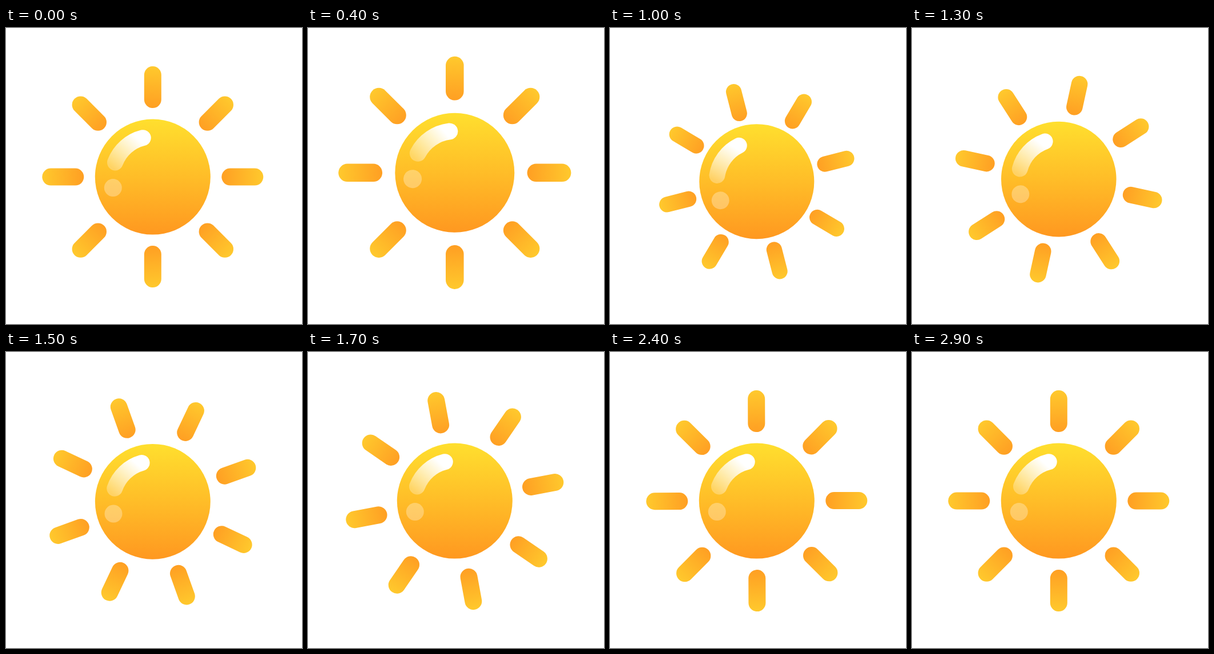
Recreate the animation shown at these times as an HTML page. Size 518 by 518 pixels, loop 3 s.

```html
<!DOCTYPE html>
<html lang="en">
<head>
<meta charset="utf-8">
<title>Sun</title>
<style>
  html, body { margin: 0; width: 100%; height: 100%; overflow: hidden; background: #fff; }
  svg { display: block; width: 100%; height: 100%; }
</style>
</head>
<body>
<svg viewBox="0 0 518 518">
  <defs>
    <linearGradient id="disc" x1="0" y1="0" x2="0" y2="1">
      <stop offset="0" stop-color="#ffdf2e"/>
      <stop offset=".5" stop-color="#ffbd28"/>
      <stop offset="1" stop-color="#ff9820"/>
    </linearGradient>
    <linearGradient id="beam" x1="0" y1="0" x2="0" y2="1">
      <stop offset="0" stop-color="#ffc92d"/>
      <stop offset="1" stop-color="#ff9f23"/>
    </linearGradient>
    <linearGradient id="shine" gradientUnits="userSpaceOnUse" x1="-14" y1="-72" x2="-68" y2="-14">
      <stop offset=".15" stop-color="#fff"/>
      <stop offset="1" stop-color="#fff" stop-opacity=".28"/>
    </linearGradient>
  </defs>
  <g id="sun">
    <g id="rays"></g>
    <g id="ball">
      <circle r="101" fill="url(#disc)"/>
      <g id="gloss">
        <path id="arc" fill="none" stroke="url(#shine)" stroke-width="28" stroke-linecap="round"/>
        <circle cx="-69.5" cy="19" r="15.5" fill="#fff" fill-opacity=".3"/>
      </g>
    </g>
  </g>
</svg>
<script>
const LOOP = 3000, STEP = 100;
const $ = id => document.getElementById(id);

// [time, value] keys
const swell = [[0, 0], [500, .058], [850, -.1], [1700, 0], [LOOP, 0]];
const spin = [[0, 0], [600, 0], [800, 12.9], [1300, 57.3], [1700, 79.5], [2100, 87.6], [2500, 90], [LOOP, 90]];

// Smooth curve through the keys that never overshoots them
function curve(keys, t) {
  const rate = i => keys[i + 1] ? (keys[i + 1][1] - keys[i][1]) / (keys[i + 1][0] - keys[i][0]) : 0;
  const slope = i => {
    const a = i ? rate(i - 1) : 0, b = rate(i);
    return a * b > 0 ? 2 * a * b / (a + b) : 0;
  };
  let i = 0;
  while (i < keys.length - 2 && t >= keys[i + 1][0]) i++;
  const [t0, a] = keys[i], [t1, b] = keys[i + 1];
  const d = t1 - t0, u = (t - t0) / d, v = 1 - u;
  return v * v * (1 + 2 * u) * a + u * u * (3 - 2 * u) * b
    + d * u * v * (v * slope(i) - u * slope(i + 1));
}

function polar(r, deg) {
  const a = deg * Math.PI / 180;
  return (r * Math.cos(a)).toFixed(2) + ' ' + (r * Math.sin(a)).toFixed(2);
}

$('arc').setAttribute('d', `M${polar(70.5, 201)}A70.5 70.5 0 0 1 ${polar(70.5, 256)}`);

for (let i = 0; i < 8; i++) {
  const ray = document.createElementNS('http://www.w3.org/2000/svg', 'rect');
  const attrs = { x: -15, y: -193.5, width: 30, height: 73, rx: 15, fill: 'url(#beam)', transform: `rotate(${i * 45})` };
  for (const k in attrs) ray.setAttribute(k, attrs[k]);
  $('rays').append(ray);
}

function draw(t) {
  const e = curve(swell, t);
  const up = Math.max(e, 0), down = Math.min(e, 0);
  const y = 260.6 - up * 140 - down * 88;
  $('sun').setAttribute('transform', `translate(256.8 ${y})`);
  $('rays').setAttribute('transform', `rotate(${curve(spin, t)}) scale(${1 + e})`);
  $('ball').setAttribute('transform', `scale(${1 + up * .66 + down * .05})`);
  $('gloss').setAttribute('transform', `rotate(${e * 133})`);
}

const start = performance.now();
function tick(now) {
  const t = Math.max(0, now - start) % LOOP;
  draw(Math.floor(t / STEP) * STEP);
  requestAnimationFrame(tick);
}
draw(0);
requestAnimationFrame(tick);
</script>
</body>
</html>
```
